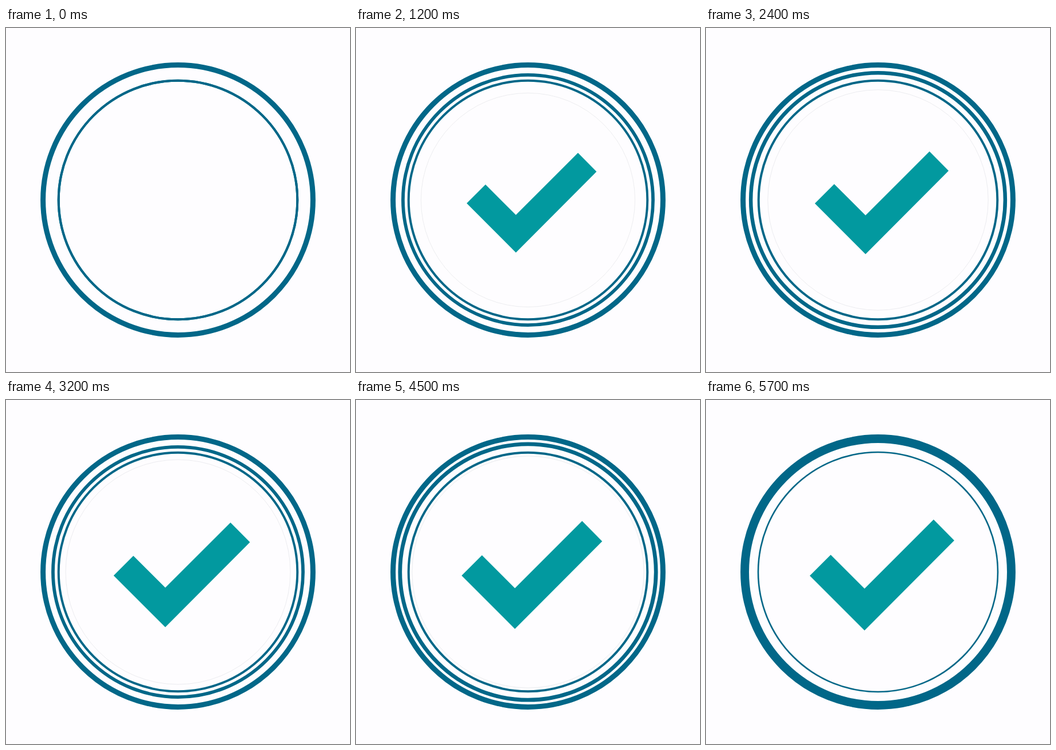
Animation of 600 by 600 pixels, one loop 5.8 s. Source, as an HTML page:

```html
<!DOCTYPE html>
<html lang="en">
<head>
<meta charset="utf-8">
<title>Check mark</title>
<style>
  html, body { margin: 0; width: 100%; height: 100%; overflow: hidden; background: #fefdff; }
  svg { display: block; width: 100vw; height: 100vh; }
  .ring { fill: none; stroke: #016788; }
  #disc { fill: #fefdff; stroke: #8a9299; stroke-opacity: .35; stroke-width: .5; }
  #tick { fill: #02999f; }
</style>
</head>
<body>
<svg viewBox="0 0 600 600">
  <circle class="ring" cx="300" cy="300" r="235.4" stroke-width="9"/>
  <circle class="ring" cx="300" cy="300" r="208.3" stroke-width="4"/>
  <circle class="ring" id="pulse" cx="300" cy="300"/>
  <g id="badge">
    <circle id="disc" r="207.7"/>
    <path id="tick" d="M-119 6.5 L-82.5 -30 L-23.5 29 L97 -91.5 L133 -55 L-23.5 102 Z"/>
  </g>
</svg>
<script>
  const LOOP = 5800, STEP = 100, PULSE = 1000;
  // Inward travel of the pulse ring: 1 at the inner ring, 0 at the outer one
  const travel = [1, .83, .64, .56, .5, .45, .4, .24, .12, .04];
  const pulse = document.getElementById('pulse');
  const badge = document.getElementById('badge');
  const start = performance.now();
  const mix = (a, b, p) => a + (b - a) * p;

  function draw(t) {
    const p = travel[Math.floor(t % PULSE / STEP)];
    pulse.setAttribute('r', mix(235.4, 208.3, p));
    pulse.setAttribute('stroke-width', mix(9, 4, p));

    const scale = mix(.8715, 1, t / 5700);
    badge.setAttribute('transform', `translate(300 300) scale(${scale})`);
    badge.setAttribute('opacity', Math.min(1, t / 400));
  }

  function tick(now) {
    const t = Math.max(0, now - start) % LOOP;
    draw(Math.floor(t / STEP) * STEP);
    requestAnimationFrame(tick);
  }

  draw(0);
  requestAnimationFrame(tick);
</script>
</body>
</html>
```
